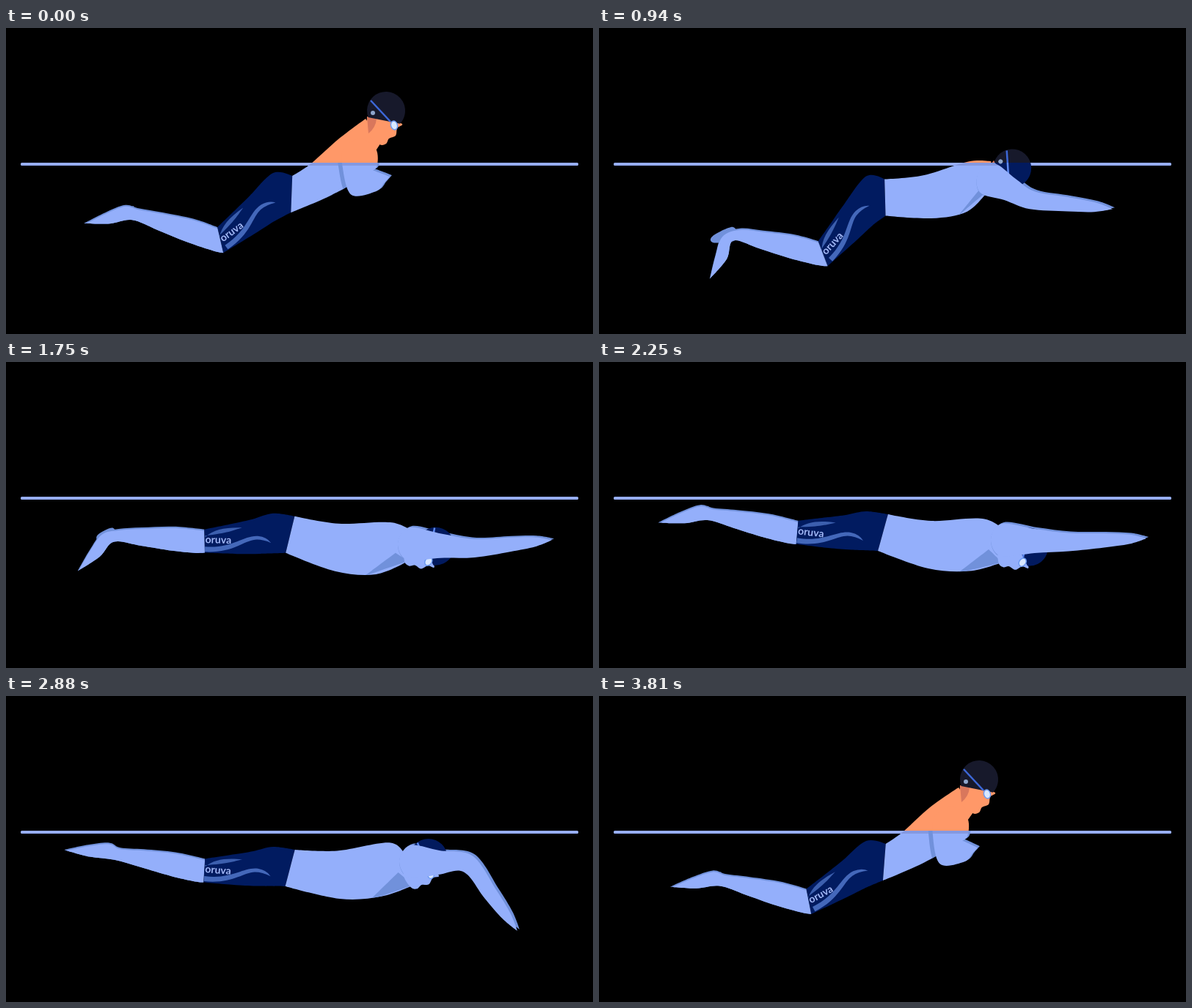
An HTML page with a canvas for the animation above (3870 ms loop, 800 by 418 pixels).

```html
<!DOCTYPE html>
<html lang="en">
<head>
<meta charset="utf-8">
<title>Breaststroke</title>
<style>
html, body { margin: 0; width: 100%; height: 100%; overflow: hidden; background: #000; }
canvas { display: block; }
</style>
</head>
<body>
<canvas id="stage" width="800" height="418"></canvas>
<script>
const ctx = document.getElementById('stage').getContext('2d');
const LOOP = 3870, STEPS = 62, LEVEL = 184, LINE = 4;
const HIP_X = 375, THIGH = 105, SHIN = 123, FOOT = 70;
const RAD = Math.PI / 180;
const tracks = {};

function key(part, step, ...v) {
  (tracks[part] ||= []).push({ step, v });
}

// Hip height, then thigh, shin and foot angles (0 points back, 90 down)
key('legs', 0, 225, 38, -17, 11);
key('legs', 9, 222, 68, -56, 27);
key('legs', 12, 225, 72, -52, 40);
key('legs', 16, 231, 40, -4, 64);
key('legs', 21, 236, 16, 3, 66);
key('legs', 36, 231, 1, -12, 10);
key('legs', 46, 233, 3, -11, -4);
key('legs', 55, 232, 13, -5, -9);
key('legs', 61, 225, 32, -14, 8);

// Shoulder, elbow, fingertips
key('arm', 0, 482,165, 482,213, 523,203);
key('arm', 9, 502,160, 528,213, 633,248);
key('arm', 21, 548,250, 635,258, 739,246);
key('arm', 36, 548,243, 640,246, 746,241);
key('arm', 46, 550,226, 630,229, 697,321);
key('arm', 50, 535,213, 560,275, 606,357);
key('arm', 55, 493,193, 463,243, 519,294);
key('arm', 61, 480,165, 477,215, 516,207);

// Head centre and tilt
key('head', 0, 518,112, 0);
key('head', 3, 519,108, 1);
key('head', 9, 535,122, 16);
key('head', 21, 584,249, 54);
key('head', 36, 587,252, 52);
key('head', 46, 576,220, 20);
key('head', 55, 536,143, 6);
key('head', 61, 518,113, 0);

const water = { skin: '#94affb', shade: '#7191db', cap: '#021a5e', strap: '#5f8af0' };
const air = { skin: '#ff9868', shade: '#d9775c', cap: '#17192b', strap: '#3d68d8' };
const edge = { ...water, skin: '#8499e0' };

// Periodic monotone cubic between key poses
function sample(part, step) {
  const keys = tracks[part], n = keys.length;
  const at = i => {
    const turn = Math.floor(i / n), k = keys[i - turn * n];
    return { s: k.step + STEPS * turn, v: k.v };
  };
  let i = n - 1;
  while (keys[i].step > step) i--;
  const [a, b, c, d] = [at(i - 1), at(i), at(i + 1), at(i + 2)];
  const h = c.s - b.s, u = (step - b.s) / h;
  const mean = (p, q) => p * q <= 0 ? 0 : 2 * p * q / (p + q);
  return b.v.map((y, j) => {
    const z = c.v[j], m = (z - y) / h;
    const m0 = mean((y - a.v[j]) / (b.s - a.s), m);
    const m1 = mean(m, (d.v[j] - z) / (d.s - c.s));
    return y + u * u * (3 - 2 * u) * (z - y)
      + h * u * (1 - u) * ((1 - u) * m0 - u * m1);
  });
}

const mix = (a, b, t) => [a[0] + (b[0] - a[0]) * t, a[1] + (b[1] - a[1]) * t];
const dist = (a, b) => Math.hypot(b[0] - a[0], b[1] - a[1]);
const reach = (p, len, deg) => [p[0] - len * Math.cos(deg * RAD), p[1] + len * Math.sin(deg * RAD)];

// Point at t along a bone, pushed sideways to the right of travel
function side(a, b, t, off) {
  const p = mix(a, b, t), k = off / dist(a, b);
  return [p[0] - (b[1] - a[1]) * k, p[1] + (b[0] - a[0]) * k];
}

// Closed smooth outline; listed points stay sharp
function outline(pts, ...sharp) {
  const n = pts.length, path = new Path2D();
  const pull = i => {
    if (sharp.includes(i % n)) return [0, 0];
    const a = pts[(i + n - 1) % n], b = pts[(i + 1) % n];
    return [(b[0] - a[0]) / 6, (b[1] - a[1]) / 6];
  };
  path.moveTo(...pts[0]);
  for (let i = 0; i < n; i++) {
    const a = pts[i], b = pts[(i + 1) % n], s = pull(i), e = pull(i + 1);
    path.bezierCurveTo(a[0] + s[0], a[1] + s[1], b[0] - e[0], b[1] - e[1], ...b);
  }
  path.closePath();
  return path;
}

function fill(path, color, dx = 0, dy = 0) {
  ctx.save();
  ctx.translate(dx, dy);
  ctx.fillStyle = color;
  ctx.fill(path);
  ctx.restore();
}

function within(path, draw) {
  ctx.save();
  ctx.clip(path);
  draw();
  ctx.restore();
}

function lowerBody([hipY, thigh, shin, foot]) {
  const hip = [HIP_X, hipY];
  const knee = reach(hip, THIGH, thigh);
  const ankle = reach(knee, SHIN, shin);
  const toe = reach(ankle, FOOT, foot);
  const bend = thigh - shin;
  const beyond = reach(knee, 1, thigh * .55 + shin * .45);
  const hem = 15.5 + bend * .045;
  const hemTop = side(knee, beyond, 0, hem), hemLow = side(knee, beyond, 0, -hem);
  const waistTop = [HIP_X + 19 - thigh * .1, hipY - 23];
  const waistLow = [HIP_X + 5 + thigh * .22, hipY + 27];
  const onShin = (t, off) => side(knee, ankle, t, off);
  const onFoot = (t, off) => side(ankle, toe, t, off);
  const onThigh = (t, off) => side(hip, knee, t, off);
  const leg = outline([
    toe, onFoot(.55, 9), onFoot(.14, 14), onShin(.96, 9), onShin(.7, 13), onShin(.35, 17),
    hemTop, hemLow,
    onShin(.12 - bend * .0016, -17), onShin(.35, -16), onShin(.7, -12), onShin(1, -9), onFoot(.5, -7)
  ], 0, 6, 7);
  const shorts = outline([
    hemTop, onThigh(.6, 20), onThigh(.35, 23), [HIP_X - 11, hipY - 27], waistTop,
    waistLow, onThigh(.3, -25), onThigh(.6, -22), hemLow
  ], 0, 4, 5, 8);
  // The far foot trails the near one while it is flexed
  const farToe = reach(ankle, Math.max(1, foot * .5), foot * .25);
  const farFoot = outline([
    side(ankle, farToe, 0, 10), side(ankle, farToe, 1, 5),
    side(ankle, farToe, 1, -4), side(ankle, farToe, 0, -8)
  ]);
  return { leg, shorts, farFoot, knee, hip, thigh, waistTop, waistLow };
}

function armShape(shoulder, elbow, tip) {
  const fore = dist(elbow, tip), upper = dist(shoulder, elbow);
  const r = 12.5 + Math.max(0, 100 - fore) * .12;
  const from = mix(elbow, shoulder, 1 / upper), to = mix(elbow, tip, 1 / fore);
  const edgeOf = s => [
    side(shoulder, elbow, 0, 22 * s), side(shoulder, elbow, .5, (r + 4) * s),
    side(from, to, .5, r * s), side(elbow, tip, .45, r * .78 * s), side(elbow, tip, .78, 6.5 * s)
  ];
  return outline([...edgeOf(-1), tip, ...edgeOf(1).reverse(), mix(shoulder, elbow, -14 / upper)], 5);
}

// Head-local point to stage
function onHead([x, y, deg], px, py) {
  const c = Math.cos(deg * RAD), s = Math.sin(deg * RAD);
  return [x + px * c - py * s, y + px * s + py * c];
}

const ribbonTop = new Path2D('M-18-3C-6-14 8-17 32-17C20-13 12-9-18-5Z');
const ribbonLow = new Path2D('M-18 10C20 12 34-7 54-6Q66-5 72 3Q60-2 50-1C34 1 20 18-18 17Z');

function drawPrint({ knee, hip, thigh }) {
  ctx.translate(...mix(knee, hip, .18));
  ctx.rotate((8 - thigh * 1.15) * RAD);
  fill(ribbonTop, '#3c5fae');
  fill(ribbonLow, '#4468ba');
  ctx.fillStyle = '#a3b8f6';
  ctx.font = 'bold 14px Lato, sans-serif';
  ctx.textAlign = 'center';
  ctx.fillText('oruva', 0, 5);
}

const face = outline([[-26, 9], [20, 18], [15, 25], [13, 35], [4, 39], [0, 46], [-9, 47], [-24, 34]], 0);
const nape = new Path2D('M-26 9L-13 12Q-14 24-24 32Z');
const cap = new Path2D();
cap.arc(0, 1, 26, 160 * RAD, 403 * RAD);
cap.closePath();

function drawHead([x, y, deg], ink) {
  ctx.save();
  ctx.translate(x, y);
  ctx.rotate(deg * RAD);
  fill(face, ink.skin);
  fill(nape, ink.shade);
  fill(cap, ink.cap);
  ctx.strokeStyle = ink.strap;
  ctx.lineWidth = 2.5;
  ctx.beginPath();
  ctx.moveTo(-21, -13);
  ctx.lineTo(6, 16);
  ctx.stroke();
  ctx.fillStyle = '#8fa6cc';
  ctx.beginPath();
  ctx.arc(-18, 4, 3, 0, 7);
  ctx.fill();
  ctx.fillStyle = '#d9e8ff';
  ctx.strokeStyle = '#6d9af0';
  ctx.lineWidth = 1.5;
  ctx.beginPath();
  ctx.ellipse(11, 21, 4.5, 6, -.3, 0, 7);
  ctx.fill();
  ctx.stroke();
  ctx.restore();
}

function drawSwimmer(step, ink) {
  const low = lowerBody(sample('legs', step));
  const { leg, shorts, waistTop, waistLow } = low;
  const [sx, sy, ex, ey, tx, ty] = sample('arm', step);
  const shoulder = [sx, sy], elbow = [ex, ey], tip = [tx, ty];
  const arm = armShape(shoulder, elbow, tip);
  const head = sample('head', step);
  const waist = mix(waistTop, waistLow, .5);
  const depth = dist(waist, shoulder) * .28;
  const onSpine = (t, off) => side(waist, shoulder, t, off);
  const throat = onHead(head, -6, 43);
  const torso = outline([
    waistTop, onSpine(.4, -20), onSpine(.85, -27), onHead(head, -28, 12),
    throat, onSpine(.75, depth), onSpine(.4, depth), waistLow
  ], 0, 3, 4, 7);

  if (ink !== air) fill(arm, ink.shade, 3, -2);
  fill(low.farFoot, ink.shade);
  fill(shorts, '#011b60');
  within(shorts, () => drawPrint(low));
  fill(leg, ink.shade);
  within(leg, () => fill(leg, ink.skin, 0, 2));
  fill(torso, ink.skin);
  if (ink !== air) within(torso, () => {
    fill(outline([onSpine(.65, depth + 4), onSpine(.9, 14), throat], 0, 1, 2), ink.shade);
    // A folded arm casts a wider shade on the ribs
    const fold = Math.max(0, 1 - dist(elbow, tip) / 105);
    fill(arm, ink.shade, -9 * fold, 1);
  });
  drawHead(head, ink);
  fill(arm, ink.skin);
}

function band(top, height, step, ink) {
  ctx.save();
  ctx.beginPath();
  ctx.rect(0, top, 800, height);
  ctx.clip();
  drawSwimmer(step, ink);
  ctx.restore();
}

function frame(now) {
  // Small lead, since steps fall on whole hundredths of a second
  const step = Math.floor((now % LOOP + 3) / LOOP * STEPS) % STEPS;
  ctx.fillStyle = '#000';
  ctx.fillRect(0, 0, 800, 418);
  ctx.fillStyle = '#97aefa';
  ctx.beginPath();
  ctx.roundRect(20, LEVEL, 760, LINE, 1.5);
  ctx.fill();
  band(0, LEVEL, step, air);
  band(LEVEL, LINE, step, edge);
  band(LEVEL + LINE, 418, step, water);
  requestAnimationFrame(frame);
}
requestAnimationFrame(frame);
</script>
</body>
</html>
```
